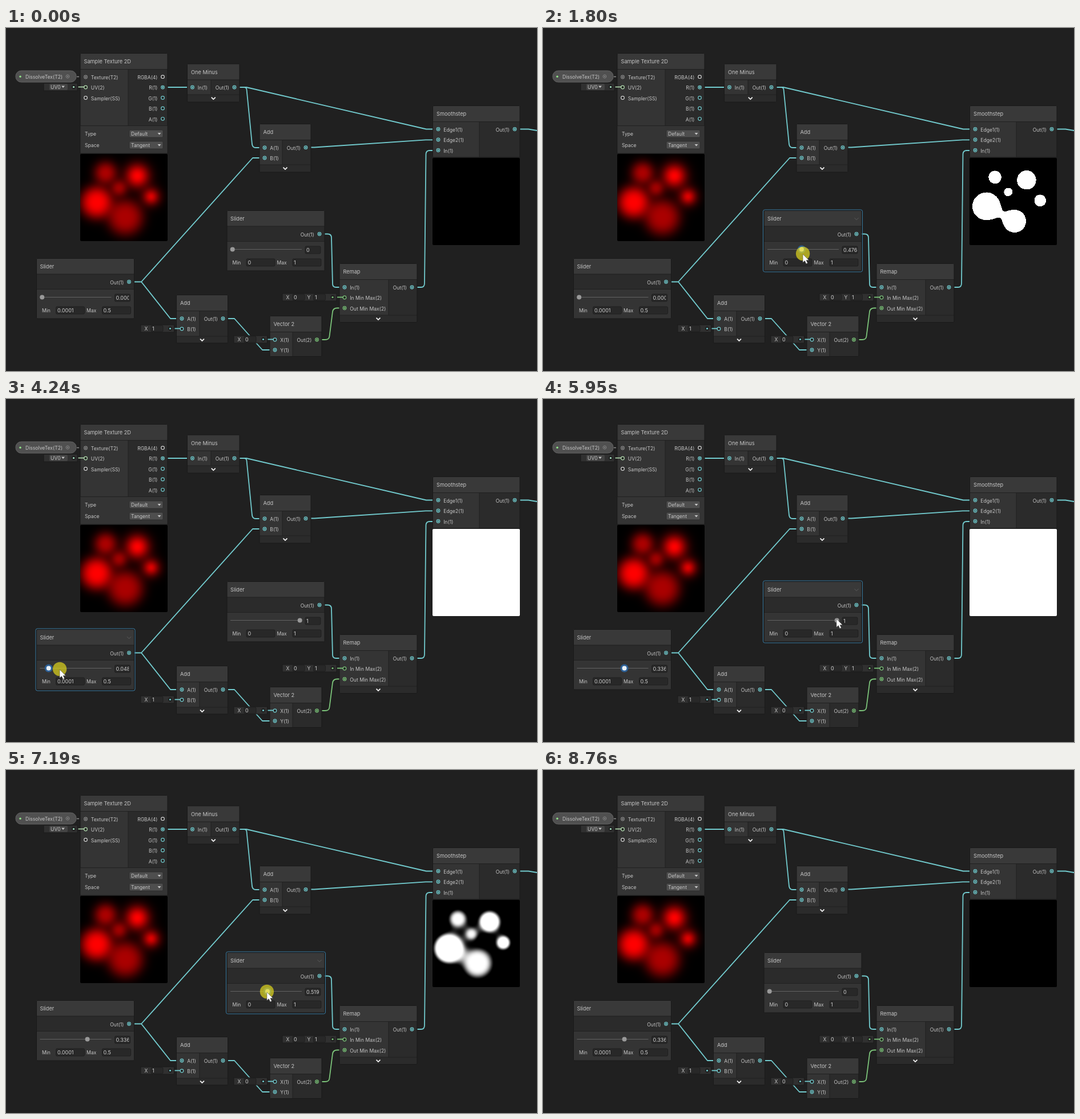
An HTML page with a canvas that plays this animation: 930x602 px, repeating every 8.83 s.

```html
<!DOCTYPE html>
<html lang="en">
<head>
<meta charset="utf-8">
<title>Dissolve shader graph</title>
<style>
  html, body { margin: 0; width: 100%; height: 100%; overflow: hidden; background: #202020; }
  canvas { position: absolute; border-radius: 2px; }
  #texture { left: 130px; top: 221px; }
  #preview { left: 747px; top: 228px; }
  svg { position: absolute; left: 0; top: 0; font: 8.6px Inter, "Open Sans", sans-serif; fill: #c6c6c6; }
  .title { font-size: 9.2px; }
  .value { font-size: 9px; fill: #d0d0d0; }
</style>
</head>
<body>
<canvas id="texture" width="153" height="153"></canvas>
<canvas id="preview" width="153" height="153"></canvas>
<svg id="stage" width="930" height="602" viewBox="0 0 930 602"></svg>
<script>
const LOOP = 8830, SIZE = 153;
const CYAN = '#72cbce', GREEN = '#7cc47a', WHITE = '#d6d6d6', GRAY = '#8a8a8a';
const $ = id => document.getElementById(id);

// ---- Static drawing helpers ----
const rect = (x, y, w, h, fill, extra = '') =>
  `<rect x="${x}" y="${y}" width="${w}" height="${h}" fill="${fill}" ${extra}/>`;
const text = (x, y, s, cls = '', extra = '') => `<text x="${x}" y="${y}" class="${cls}" ${extra}>${s}</text>`;
const circle = (x, y, r, fill, extra = '') => `<circle cx="${x}" cy="${y}" r="${r}" fill="${fill}" ${extra}/>`;
const line = (d, color, width = 1.8) =>
  `<path d="${d}" fill="none" stroke="${color}" stroke-width="${width}" stroke-linejoin="round"/>`;
const chevron = (x, y, color = '#f0f0f0', width = 1.8) => line(`M${x - 3.5} ${y - 1.8}l3.5 3.5l3.5 -3.5`, color, width);
const field = (x, y, w, h = 13) => rect(x, y, w, h, '#282828', 'rx="2" stroke="#1c1c1c" stroke-width=".8"');

function port(x, y, label, { color = CYAN, linked = false, out = false } = {}) {
  return circle(x, y, 2.8, '#222', `stroke="${color}" stroke-width="1.2"`) +
    (linked ? circle(x, y, 1.5, color) : '') +
    text(out ? x - 9 : x + 9.3, y + 4.2, label, '', out ? 'text-anchor="end"' : '');
}

function node(x, y, w, h, title, split, bodyEnd, folds) {
  return rect(x, y, w, h, '#2b2b2b') +
    rect(x, y + 28, split - x, bodyEnd - y - 28, '#343434') +
    rect(x, y, w, 27.5, '#393939') +
    line(`M${x} ${y + 28}h${w}M${split} ${y + 28}V${bodyEnd}`, '#202020', 1) +
    (folds ? line(`M${x} ${bodyEnd}h${w}`, '#202020', 1) + chevron(x + w / 2, bodyEnd + 6.5) : '') +
    rect(x, y, w, h, 'none', 'rx="1.5" stroke="#191919"') +
    text(x + 6.5, y + 17.8, title, 'title');
}

function dropdown(y, label, value) {
  return text(138, y + 9.5, label) +
    rect(216, y, 59, 13, '#4e4e4e', 'rx="2" stroke="#2c2c2c" stroke-width=".8"') +
    text(219, y + 9.7, value) + `<path d="M265.500 ${y + 5}h6l-3 3.500z"/>`;
}

function inlineInput(x, y, w, parts, color, portX) {
  return rect(x, y, w, 13, '#303030', 'stroke="#1a1a1a"') +
    parts.map(([name, value], i) =>
      field(x + 18 + i * 36.5, y + 1, 21, 11) +
      text(x + 6.5 + i * 37, y + 9.8, name) +
      text(x + 20 + i * 37, y + 9.8, value, 'value')).join('') +
    line(`M${x + w + 1} ${y + 6.5}H${portX}`, color) +
    circle(x + w - 7, y + 6.5, 3.4, '#1e1e1e') + circle(x + w - 7, y + 6.5, 1.6, color);
}

// Drawn around the right-hand slider's coordinates, then moved.
function sliderNode(id, dx, dy, min, max, valueWidth) {
  return `<g transform="translate(${dx} ${dy})">` +
    `<clipPath id="${id}Clip">${rect(524, 383, valueWidth, 13, '#000')}</clipPath>` +
    rect(387, 320.5, 171, 105.5, '#343434') + rect(387, 320.5, 171, 27, '#393939') +
    rect(387, 348, 171, 26, '#2b2b2b') + line('M387 348h171M387 374.500h171', '#202020', 1) +
    rect(387, 320.5, 171, 105.5, 'none', 'rx="1.500" stroke="#191919"') +
    text(393, 338, 'Slider', 'title') +
    port(549, 361.5, 'Out(1)', { linked: true, out: true }) +
    line('M393 388.500H518', '#626262', 1.2) +
    circle(0, 388.5, 7, '#2c5f95', `id="${id}Halo"`) + circle(0, 388.5, 4, '#999', `id="${id}Knob"`) +
    field(524, 383, 27) + text(526, 393, '', 'value', `id="${id}Value" clip-path="url(#${id}Clip)"`) +
    text(396.5, 414.5, 'Min') + field(421, 405, 50) + text(423.5, 414.5, min, 'value') +
    text(474.5, 414.5, 'Max') + field(502, 405, 50) + text(504, 414.5, max, 'value') +
    `<g id="${id}Hover">` + chevron(549, 335, '#5c5c5c', 1) +
    rect(385.5, 319, 174, 109, 'none', 'rx="3" stroke="#38799f"') + '</g></g>';
}

const linked = { linked: true }, output = { linked: true, out: true };

const wires = [
  'M274 104H326', 'M400 104H421L736 177.500H757',
  'M400 104H417Q421 104 421.500 108L431 204Q432 210 437 210H453',
  'M525 209.500H540L735 196.300H757', 'M215.500 445.500H237L432 228H453', 'M237 445.500L288 510H308',
  'M380 510H400L449 565H471',
  'M549 361.500H563Q570 361.500 570 368L572 449Q572 455 578 455H593',
  'M711 455H727Q733 455 733 448L735.500 221Q736 215 742 215H757',
  'M891 177.500H915L930 180'
].map(d => line(d, CYAN)).join('') +
  line('M544.500 547H559Q566 547 566.500 541L572 498Q573 491.500 580 491.500H593', GREEN);

const sampleNode =
  node(130, 44.5, 153, 175.5, 'Sample Texture 2D', 214, 171, false) +
  rect(130.5, 172, 152, 47.5, '#343434') + line('M130 171.500h153', '#202020', 1) +
  port(139.5, 86, 'Texture(T2)', { color: GRAY, linked: true }) +
  port(139.5, 104, 'UV(2)', { color: '#b5dfb2' }) +
  port(139.5, 122.5, 'Sampler(SS)', { color: WHITE }) +
  ['RGBA(4)', 'R(1)', 'G(1)', 'B(1)', 'A(1)'].map((label, i) =>
    port(274.5, 85.7 + i * 18.4, label, { color: i ? CYAN : WHITE, linked: i === 1, out: true })).join('') +
  dropdown(179, 'Type', 'Default') + dropdown(199, 'Space', 'Tangent');

const property =
  line('M124 85.500h4m2 0h7', '#8a8a8a', 1.4) +
  rect(17, 75, 106, 20, '#505050', 'rx="9.500" stroke="#646464"') +
  circle(25, 85.3, 1.7, '#8fe388') + text(34, 89, 'DissolveTex(T2)') +
  circle(108, 85, 2.8, '#3c3c3c', `stroke="${GRAY}"`) + circle(108, 85, 1.3, GRAY);

const uvInput =
  rect(66, 97, 59, 13, '#303030', 'stroke="#1a1a1a"') + rect(76, 98, 32, 11, '#444', 'rx="2"') +
  text(78, 106.7, 'UV0') + '<path d="M97 101.500h6l-3 3.500z"/>' +
  line('M126.500 103.500H137', '#b5dfb2', 1.6) +
  circle(118.5, 103.5, 3.4, '#1e1e1e') + circle(118.5, 103.5, 1.6, '#a8e6c8');

$('stage').innerHTML =
  wires + property + sampleNode + uvInput +
  node(317.5, 63, 91.5, 67, 'One Minus', 359, 117, true) +
  port(326.5, 104, 'In(1)', linked) + port(400, 104, 'Out(1)', output) +
  node(444, 168.5, 90, 84.5, 'Add', 484, 240, true) +
  port(453, 210, 'A(1)', linked) + port(453, 228, 'B(1)', linked) + port(525, 209.7, 'Out(1)', output) +
  node(747.5, 136.5, 152.5, 90.5, 'Smoothstep', 829, 227, false) +
  port(757, 177.5, 'Edge1(1)', linked) + port(757, 196, 'Edge2(1)', linked) +
  port(757, 214.5, 'In(1)', linked) + port(891, 177.5, 'Out(1)', output) +
  sliderNode('fade', 0, 0, '0', '1', 26.5) + sliderNode('soft', -333.5, 84, '0.0001', '0.5', 24.8) +
  node(584, 413.5, 136, 103, 'Remap', 670, 504, true) +
  port(593, 455, 'In(1)', linked) + port(593, 473, 'In Min Max(2)', { color: GREEN }) +
  port(593, 491.5, 'Out Min Max(2)', { color: GREEN, linked: true }) + port(711, 455, 'Out(1)', output) +
  node(298.5, 468.5, 90, 84.5, 'Add', 339, 541, true) +
  port(308, 510, 'A(1)', linked) + port(308, 528, 'B(1)') + port(380, 510, 'Out(1)', output) +
  node(462, 505.5, 91, 71, 'Vector 2', 502, 576, false) +
  port(471, 547, 'X(1)') + port(471, 565, 'Y(1)', linked) +
  port(544.5, 547, 'Out(2)', { color: GREEN, linked: true, out: true }) +
  inlineInput(236, 521, 58.5, [['X', 1]], CYAN, 305) +
  inlineInput(399, 540, 58.5, [['X', 0]], CYAN, 468) +
  inlineInput(484, 466, 95, [['X', 0], ['Y', 1]], GREEN, 590) +
  '<g id="cursor">' + circle(0, -1, 12.2, '#e0d61c', 'id="press" opacity=".7"') +
  '<path d="M0 0V14.500L3.400 11.500L5.800 16.800L8.400 15.600L6 10.500H10.500Z" fill="#fff" stroke="#444" stroke-width=".5"/></g>';

// ---- Height field: soft blobs as [x, y, peak, width, falloff] ----
const blobs = [
  [44.5, 33.5, .667, 19.9, 2.4], [100, 38.5, 1, 20.4, 2.07], [68, 60, .6, 14.5, 2.2],
  [29, 85, 1, 27.9, 2.92], [124, 75, .87, 14.5, 1.84], [79, 111, .667, 31.4, 3.11]
];
const height = Float32Array.from({ length: SIZE * SIZE }, (_, i) => {
  const x = i % SIZE + .5, y = Math.floor(i / SIZE) + .5;
  const dark = blobs.reduce((rest, [bx, by, peak, width, falloff]) =>
    rest * (1 - peak * Math.exp(-((Math.hypot(x - bx, y - by) / width) ** falloff))), 1);
  return 1 - dark;
});

function paint(id, shade) {
  const ctx = $(id).getContext('2d');
  const image = ctx.createImageData(SIZE, SIZE);
  height.forEach((h, i) => image.data.set([...shade(h), 255], i * 4));
  ctx.putImageData(image, 0, 0);
}
paint('texture', h => [h * 255, 0, 0]);

let painted = '';
function paintPreview(fade, soft) {
  const key = fade + '/' + soft;
  if (key === painted) return;
  painted = key;
  const input = fade * (1 + soft);
  paint('preview', h => {
    const k = Math.min(1, Math.max(0, (input - 1 + h) / soft));
    const v = 255 * k * k * (3 - 2 * k);
    return [v, v, v];
  });
}

// ---- Timeline ----
const fadeKeys = [[980, 0], [1460, .32], [1600, .32], [1800, .476], [2480, .949], [2550, 1],
  [6220, 1], [7050, .56], [7190, .5198], [7940, .15], [8010, 0]];
const softKeys = [[4110, .0001], [4240, .048], [4310, .1], [4930, .33], [5000, .3362]];
const cursorKeys = [[180, 787, 562], [790, 397, 395], [980, 397, 395], [1460, 435, 396], [1600, 435, 396],
  [1800, 455, 397], [2480, 511, 398], [2550, 516, 398], [2620, 516, 398], [3370, 117, 466], [3510, 76, 471],
  [3710, 75, 471], [3970, 65, 474], [4110, 65, 474], [4240, 94, 475], [4930, 141, 475], [5050, 142, 475],
  [5820, 517, 385], [5890, 517, 385], [5950, 514, 386], [6220, 515, 387], [7050, 463, 389], [7190, 457, 390],
  [7940, 402, 391], [8010, 397, 391], [8080, 397, 391], [8490, 470, 612]];
const presses = [[980, 2600], [4110, 5040], [6220, 8070]];

function sample(keys, t, ease = k => k) {
  const next = keys.findIndex(key => key[0] > t);
  if (next === 0) return keys[0].slice(1);
  if (next < 0) return keys[keys.length - 1].slice(1);
  const a = keys[next - 1], b = keys[next];
  const k = ease((t - a[0]) / (b[0] - a[0]));
  return a.slice(1).map((v, i) => v + (b[i + 1] - v) * k);
}
const smooth = k => k * k * (3 - 2 * k);
const show = (id, on) => $(id).setAttribute('display', on ? 'inline' : 'none');
// The fields cut digits off rather than round them.
const truncated = v => v > 0 && v < 1 ? v.toFixed(6).slice(0, 5) : String(v);

function updateSlider(id, x, label, focused, hovered) {
  for (const part of ['Halo', 'Knob']) $(id + part).setAttribute('cx', x);
  $(id + 'Knob').setAttribute('fill', focused ? '#e9f1f8' : '#999');
  $(id + 'Value').textContent = label;
  show(id + 'Halo', focused);
  show(id + 'Hover', hovered);
}

function render(t) {
  const [fade] = sample(fadeKeys, t), [soft] = sample(softKeys, t);
  const pressed = presses.some(([from, to]) => t >= from && t < to);
  const [x, y] = sample(cursorKeys, t, pressed ? undefined : smooth);
  const visible = t >= 180 && t < 8490;
  const over = (left, top) => visible && x > left && x < left + 171 && y > top && y < top + 106;
  const fadeFocus = t >= 980 && t < 4110 || t >= 6220 && t < 8760;

  updateSlider('fade', 396.7 + 118 * fade, truncated(fade), fadeFocus, over(387, 320));
  updateSlider('soft', 396.7 + 236 * soft, soft.toFixed(4), t >= 4110 && t < 6220, over(53.5, 404));
  $('cursor').setAttribute('transform', `translate(${x} ${y})`);
  show('cursor', visible);
  show('press', pressed);
  paintPreview(fade, soft);
}

const start = performance.now();
function tick() {
  render((performance.now() - start) % LOOP);
  requestAnimationFrame(tick);
}
tick();
</script>
</body>
</html>
```
